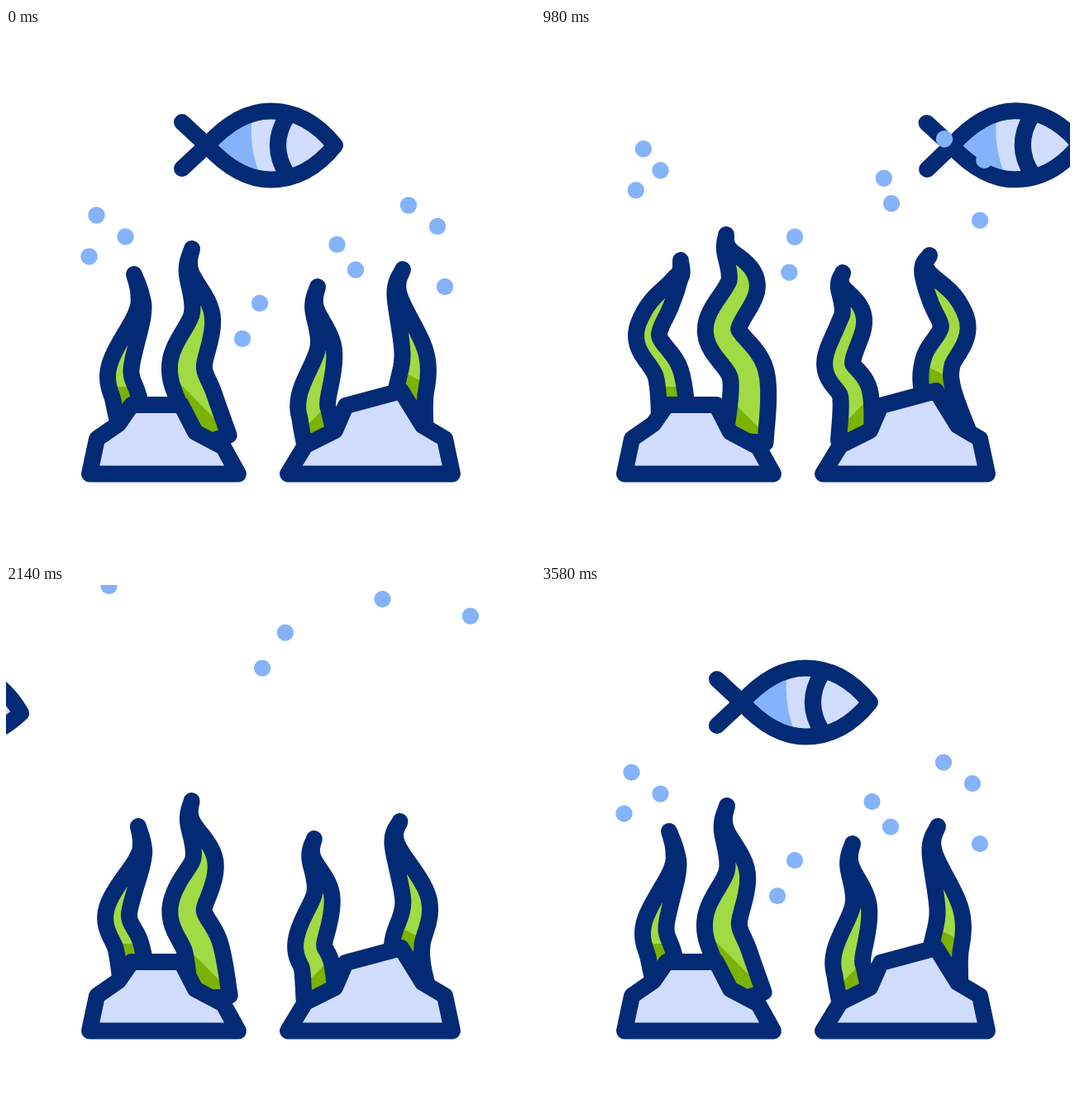
Recreate the animation shown at these times as an HTML page with a canvas. Size 640 by 640 pixels, loop 3.6 s.

```html
<!DOCTYPE html>
<html lang="en">
<head>
<meta charset="utf-8">
<title>Fish and seaweed</title>
<style>
html, body { margin: 0; width: 100%; height: 100%; overflow: hidden; background: #fff; }
canvas { display: block; width: 640px; height: 640px; }
</style>
</head>
<body>
<canvas id="stage" width="640" height="640"></canvas>
<script>
const ctx = document.getElementById("stage").getContext("2d");
const LOOP = 3600, SWAY = LOOP / 2;
const NAVY = "#032a75", PALE = "#d0ddff", BLUE = "#85b3fa", LIME = "#a1db43", MOSS = "#7ab300";

// A spine runs from tip to root: x, y and the sideways reach of each bend in full sway.
// The dark foot lies below a line through (x, y) with the given slope.
const weeds = [
  { girth: 11, foot: [148, 434, 0],
    spine: [[155,298,14], [162,322,7], [161,348,0], [138,412,-9], [145,448,9], [153,480,8]] },
  { girth: 16.5, foot: [230, 450, 1],
    spine: [[225,267,-1], [221,294,4], [237,348,7], [219,408,0], [231,450,20], [247,500,0]] },
  { girth: 13.5, foot: [378, 467, -1],
    spine: [[377,313,-12], [373,338,-11], [387,388,-10], [372,448,-12], [374,472,6], [380,500,0]] },
  { girth: 13.5, foot: [490, 421, 0.5],
    spine: [[480,292,-10], [473,322,-8], [494,396,6], [489,446,-9], [488,470,-8], [488,495,10]] }
];
// How far each bend climbs in full sway.
const CLIMB = [17, 26, 38, 42, 30, 0];

const rocks = [
  "M101 539.5 L110 497 136 479 152 456 212 456 229 489 263 507 281 539.5 Z",
  "M341 539.5 L362 505 398 487 411 457 478 439 504 481 531 497 540 539.5 Z"
].map(d => new Path2D(d));

const fishBody = new Path2D("M-77 0 C-58 -21 -33 -41.5 0 -41.5 S58 -25 78 0 C58 25 33 41.5 0 41.5 S-58 21 -77 0 Z");
const fishLines = new Path2D("M-107 28 L-77 0 L-107 -28 M20 -35 Q-2 0 20 35");
const fishBack = new Path2D("M-90 -50 L-20 -50 Q-30 0 -10 42 L-90 42 Z");

// Bubbles in three groups, each with its own sideways drift as [time, reach] poses.
const bubbleGroups = [
  { drift: [[0,0], [440,34], [1210,9], [2300,25], [LOOP,10]],
    spots: [[109.5,226.5], [100.5,276.5], [286,376], [400.5,262], [522,240]] },
  { drift: [[0,0], [580,34], [970,0], [1500,34], [LOOP,20]],
    spots: [[144.5,252.5], [307,333], [531,313]] },
  { drift: [[0,0], [540,34], [970,1], [1620,33], [LOOP,30]],
    spots: [[423,292.5], [487,214.5]] }
];

const clamp = u => Math.min(1, Math.max(0, u));
const smooth = u => u * u * (3 - 2 * u);
const mix = (a, b, u) => a + (b - a) * u;

function eased(poses, t) {
  const next = Math.max(1, poses.findIndex(([time]) => time > t));
  const [t0, a] = poses[next - 1], [t1, b] = poses[next];
  return mix(a, b, smooth((t - t0) / (t1 - t0)));
}

// Distance swum after a start with constant acceleration over `ramp` ms.
function glide(time, ramp) {
  const speed = 0.325;
  return speed * (time < ramp ? time * time / (2 * ramp) : time - ramp / 2);
}

const catmull = (a, b, c, d, u) =>
  b + u / 2 * (c - a + u * (2 * a - 5 * b + 4 * c - d + u * (3 * (b - c) + d - a)));

function sampleCurve(points, steps = 12) {
  const at = i => points[Math.min(points.length - 1, Math.max(0, i))];
  const samples = [];
  for (let n = 0; n <= (points.length - 1) * steps; n++) {
    const i = Math.floor(n / steps), u = n / steps - i;
    samples.push([0, 1].map(k => catmull(at(i - 1)[k], at(i)[k], at(i + 1)[k], at(i + 2)[k], u)));
  }
  return samples;
}

// The body widens along its spine, sooner when it sways.
function weedOutline(weed, sway) {
  const line = sampleCurve(weed.spine.map(([x, y, reach], i) => [x + reach * sway, y - CLIMB[i] * sway]));
  const span = mix(145, 72, sway), left = [], right = [];
  let length = 0;
  line.forEach(([x, y], i) => {
    const a = line[Math.max(0, i - 1)], b = line[Math.min(line.length - 1, i + 1)];
    const dx = b[0] - a[0], dy = b[1] - a[1], size = Math.hypot(dx, dy);
    if (i) length += Math.hypot(x - a[0], y - a[1]);
    const half = weed.girth * smooth(clamp(length / span)) + 0.03 * length;
    const nx = dy / size * half, ny = -dx / size * half;
    left.push([x - nx, y - ny]);
    right.unshift([x + nx, y + ny]);
  });
  const outline = new Path2D();
  [...left, ...right].forEach(p => outline.lineTo(...p));
  outline.closePath();
  return outline;
}

function fillInside(shape, color, part, partColor) {
  ctx.fillStyle = color;
  ctx.fill(shape);
  ctx.save();
  ctx.clip(shape);
  ctx.fillStyle = partColor;
  ctx.fill(part);
  ctx.restore();
  ctx.stroke(shape);
}

function drawWeed(weed, sway) {
  const [x, y, slope] = weed.foot, reach = 60;
  const foot = new Path2D();
  foot.moveTo(x - reach, y - reach * slope);
  foot.lineTo(x + reach, y + reach * slope);
  foot.lineTo(x + reach, 530);
  foot.lineTo(x - reach, 530);
  fillInside(weedOutline(weed, sway), LIME, foot, MOSS);
}

function drawRock(rock) {
  ctx.fillStyle = PALE;
  ctx.fill(rock);
  ctx.stroke(rock);
}

function drawFish(t) {
  const settle = smooth(clamp(t / 330)) * smooth(clamp((LOOP - t) / 500));
  const tilt = settle * (0.6 + 7.6 * Math.cos((t - 335) / 890 * 2 * Math.PI));
  const x = t < LOOP / 2 ? glide(t, 400) : -glide(LOOP - t, 585);
  ctx.save();
  ctx.translate(320 + x, 142 + tilt / 4);
  ctx.rotate(tilt * Math.PI / 180);
  fillInside(fishBody, PALE, fishBack, BLUE);
  ctx.stroke(fishLines);
  ctx.restore();
}

function drawBubble(x, y, radius) {
  ctx.beginPath();
  ctx.arc(x, y, radius, 0, 2 * Math.PI);
  ctx.fill();
}

// One set rises out of view while a fresh one floats up to take its place.
function drawBubbles(t) {
  const u = t / LOOP, rise = smooth(u) * (441 - 52 * u ** 3);
  const below = 102 * smooth(clamp((LOOP - t) / 1080));
  const radius = 10.2, freshRadius = radius * smooth(clamp((t - 2520) / 300));
  ctx.fillStyle = BLUE;
  for (const { drift, spots } of bubbleGroups) {
    const shift = eased(drift, t);
    for (const [x, y] of spots) {
      drawBubble(x + shift, y - rise, radius);
      drawBubble(x - below * 0.237, y + below, freshRadius);
    }
  }
}

function draw(t) {
  ctx.fillStyle = "#fff";
  ctx.fillRect(0, 0, 640, 640);
  ctx.strokeStyle = NAVY;
  ctx.lineWidth = 20;
  ctx.lineCap = ctx.lineJoin = "round";
  const swing = 1 - Math.abs(2 * (t % SWAY) / SWAY - 1);
  const sway = smooth(clamp(1.05 * swing));
  weeds.forEach(weed => drawWeed(weed, sway));
  rocks.forEach(drawRock);
  drawFish(t);
  drawBubbles(t);
}

function tick() {
  draw(performance.now() % LOOP);
  requestAnimationFrame(tick);
}
tick();
</script>
</body>
</html>
```
